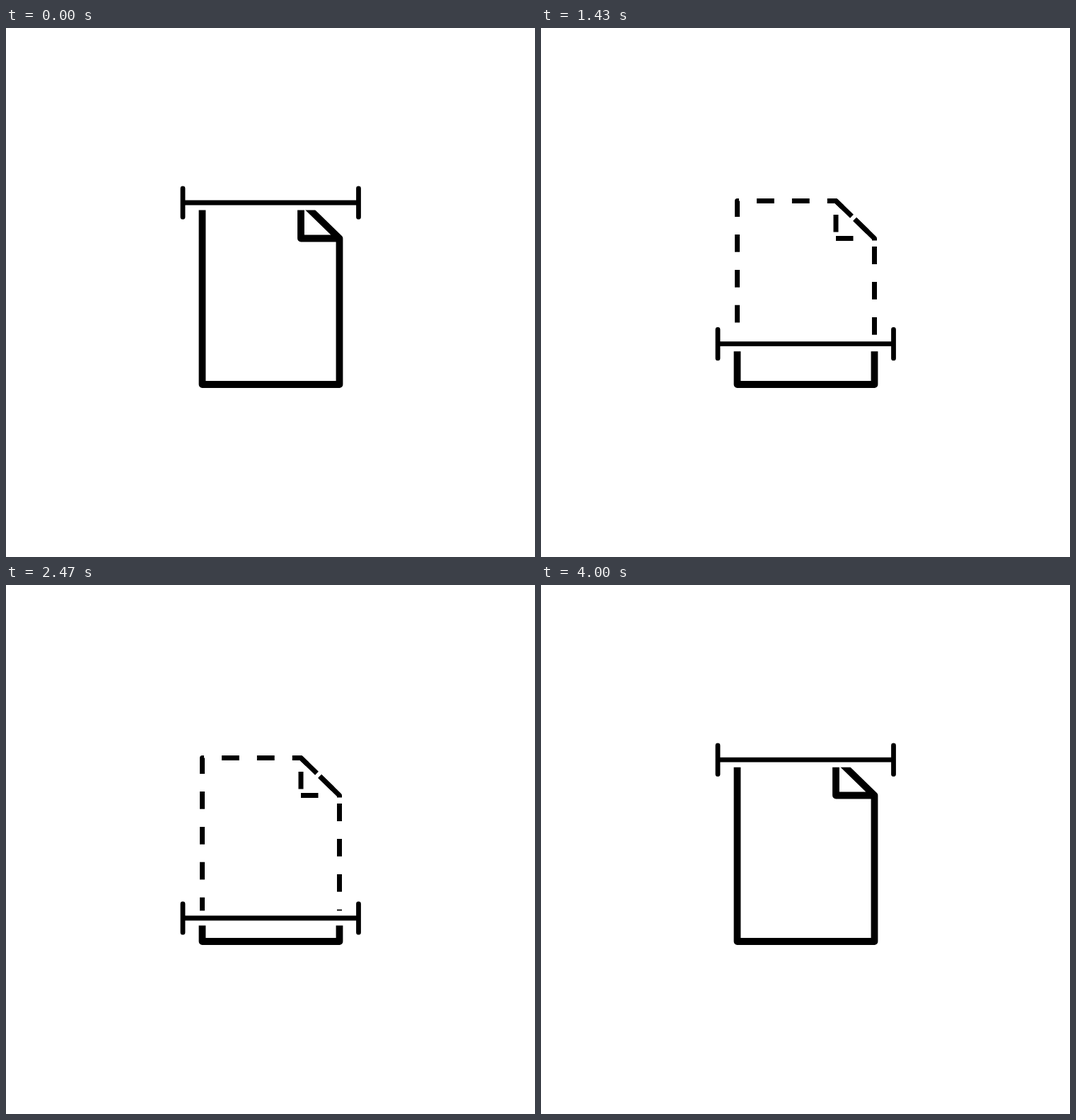
An HTML page for the animation above (4.03 s loop, 748 px wide and 748 px high).

```html
<!DOCTYPE html>
<html lang="en">
<head>
<meta charset="utf-8">
<title>Document scan</title>
<style>
  html, body { margin: 0; width: 100%; height: 100%; overflow: hidden; background: #fff; }
  svg { display: block; width: 100%; height: 100%; }
  path { fill: none; stroke: #000; stroke-linejoin: round; }
</style>
</head>
<body>
<svg viewBox="0 0 748 748">
  <clipPath id="above"><rect id="aboveRect" width="748" height="0"/></clipPath>
  <clipPath id="below"><rect id="belowRect" width="748" height="748"/></clipPath>

  <g clip-path="url(#above)" stroke-width="7">
    <path stroke-dasharray="24.8 25.1" d="M277.5 466.5V244.5H417L471.5 297.5V491"/>
    <!-- folded corner -->
    <path d="M417 264V288.5M417 297.5H441.5M416 244.5H417L439.5 266.2M443.6 270.3L471.5 297.5V300.5"/>
  </g>

  <g clip-path="url(#below)" stroke-width="9.8">
    <path d="M277.5 244.5H417L471.5 297.5V504H277.5ZM417 244.5V297.5H471.5"/>
  </g>

  <path id="bar" stroke-width="6.8" stroke-linecap="round" d="M250 -20.2V20.2M498.5 -20.2V20.2M250 0H498.5"/>
</svg>
<script>
  const LOOP = 4030, STEP = 1000 / 30, HALF = 2000;
  const TOP = 247, TRAVEL = 254.7, GAP = 10.5;
  const byId = id => document.getElementById(id);
  const bar = byId('bar'), aboveRect = byId('aboveRect'), belowRect = byId('belowRect');

  const smooth = p => p * p * (3 - 2 * p);

  function barY(time) {
    // 30 steps a second; the bar rests for the first one
    const step = Math.floor((time + 5) / STEP);
    const moving = Math.max(0, step - 1) * STEP;
    return TOP + TRAVEL * smooth(1 - Math.abs(moving / HALF - 1));
  }

  function draw(now) {
    const y = barY(now % LOOP);
    bar.setAttribute('transform', `translate(0 ${y})`);
    aboveRect.setAttribute('height', y - GAP);
    belowRect.setAttribute('y', y + GAP);
    requestAnimationFrame(draw);
  }
  draw(0);
</script>
</body>
</html>
```
